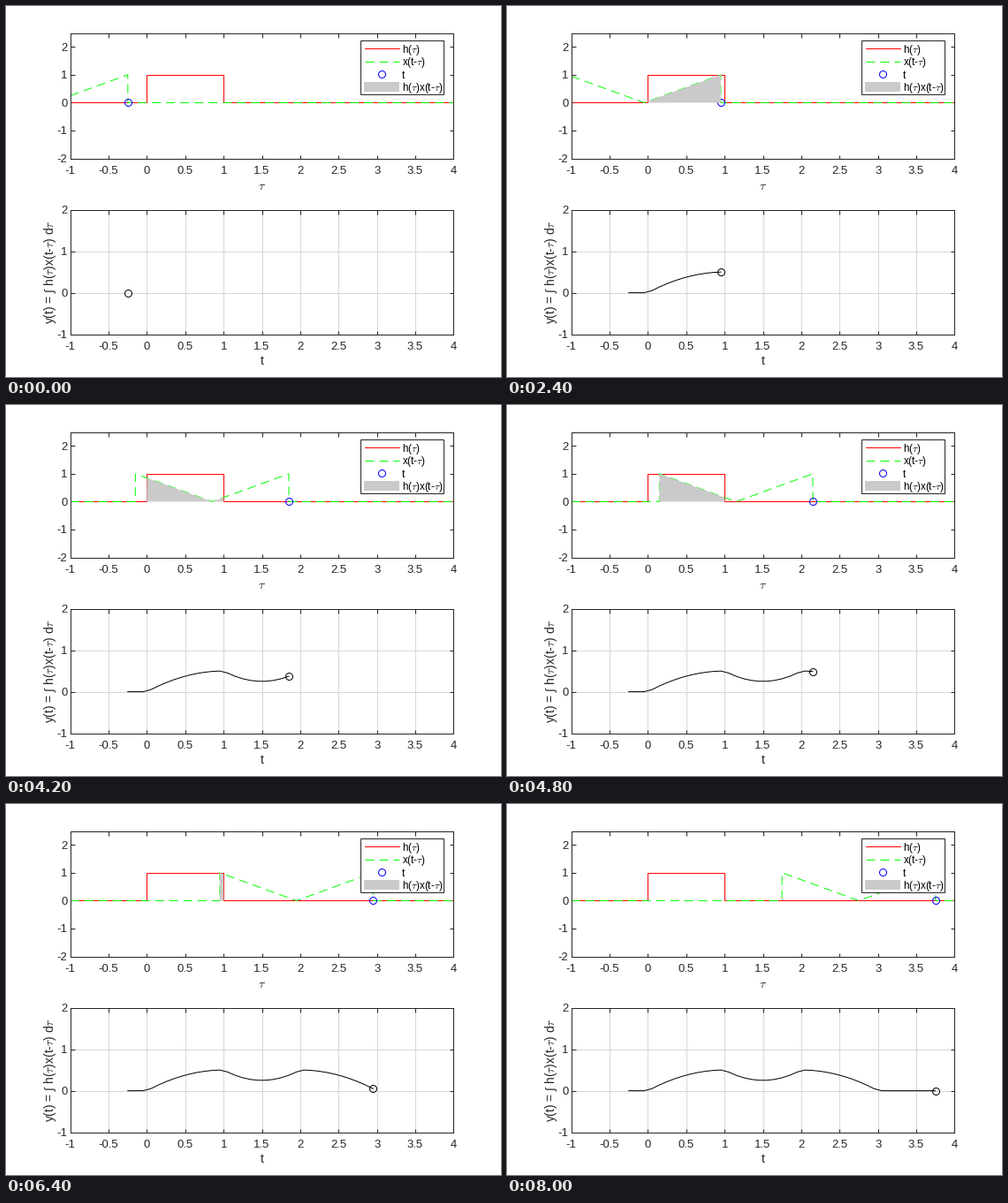
A matplotlib script that plays this animation: 560x420 px, repeating every 8200 ms.

```python
import numpy as np
import matplotlib as mpl
import matplotlib.pyplot as plt
from matplotlib.animation import FuncAnimation
from matplotlib.patches import Rectangle

W, H, DPI = 560, 420, 80
PX = 72 / DPI  # one pixel in points
INK, GREY, GRID = "#262626", "#cacaca", "#d8d8d8"
DASH = (0, (10, 6))

mpl.rcParams.update({
    "font.family": "Liberation Sans",
    "mathtext.fontset": "cm",
    "lines.linewidth": PX,
    "lines.markersize": 8 * PX,
    "axes.linewidth": PX,
    "axes.edgecolor": INK,
})

FRAMES = 41
times = -0.25 + 0.1 * np.arange(FRAMES)
tau = np.arange(-500, 2001) / 500


def vee(s):
    s = np.round(s, 6)
    return np.where((s >= 0) & (s <= 2), np.abs(s - 1), 0)


def vee_integral(s):
    d = np.clip(s, 0, 2) - 1
    return d * np.abs(d) / 2


gate = (tau >= 0) & (tau <= 1)
y = vee_integral(times) - vee_integral(times - 1)

fig = plt.figure(figsize=(W / DPI, H / DPI), dpi=DPI, facecolor="white")


def plot_box(top, bottom, ylim, yticks):
    left, right = 72.7, 506.4
    ax = fig.add_axes([left / W, 1 - bottom / H,
                       (right - left) / W, (bottom - top) / H])
    ax.set(xlim=(-1, 4), ylim=ylim)
    xticks = np.arange(-1, 4.1, 0.5)
    ax.set_xticks(xticks, [f"{v:g}" for v in xticks])
    ax.set_yticks(yticks, [str(v) for v in yticks])
    ax.tick_params(direction="in", top=True, right=True, length=4.5 * PX,
                   width=PX, color=INK, labelcolor=INK, labelsize=13.1 * PX)
    ax.tick_params(axis="x", pad=8 * PX)
    ax.tick_params(axis="y", pad=3.3 * PX)
    return ax


upper = plot_box(30.55, 172.55, (-2, 2.5), range(-2, 3))
lower = plot_box(230.6, 371.6, (-1, 2), range(-1, 3))
lower.set_axisbelow(True)
lower.grid(color=GRID, linewidth=PX)

# Pixel-space layer for labels and legend
layer = fig.add_axes([0, 0, 1, 1], zorder=5)
layer.set(xlim=(0, W), ylim=(H, 0))
layer.axis("off")


def label(x, y, s, size=13.9, color=INK, **kw):
    layer.text(x, y, s, fontsize=size * PX, color=color,
               va="baseline", rotation_mode="anchor", **kw)


label(290, 207.5, r"$\tau$", ha="center")
label(290, 406, "t", ha="center")
label(54, 301.5, r"y(t) = ∫ h($\tau$)x(t-$\tau$) d$\tau$",
      ha="center", rotation=90)

layer.add_patch(Rectangle((401, 39), 94, 61, facecolor="white",
                          edgecolor=INK, linewidth=PX))
layer.plot([406, 445], [48, 48], color="red")
layer.plot([406, 445], [63, 63], color="lime", ls=DASH)
layer.plot(424.6, 77, "o", mfc="none", mec="blue", mew=PX)
layer.add_patch(Rectangle((405, 86), 40, 11, facecolor=GREY, linewidth=0))
names = (r"h($\tau$)", r"x(t-$\tau$)", "t", r"h($\tau$)x(t-$\tau$)")
for i, name in enumerate(names):
    label(448, 52.6 + 14.6 * i, name, size=11.6, color="black")

upper.plot([-1, 0, 0, 1, 1, 4], [0, 0, 1, 1, 0, 0], color="red")
wave, = upper.plot([], [], color="lime", ls=DASH)
dot, = upper.plot([], [], "o", mfc="none", mec="blue", mew=PX)
area, = upper.fill([0, 0, 0], [0, 0, 0], color=GREY, linewidth=0, zorder=3)
curve, = lower.plot([], [], color="black")
head, = lower.plot([], [], "o", mfc="none", mec="black", mew=PX)


def update(k):
    t = times[k]
    x = vee(t - tau)
    wave.set_data(tau, x)
    dot.set_data([t], [0])
    area.set_xy(np.column_stack([tau, gate * x]))
    curve.set_data(times[:k + 1], y[:k + 1])
    head.set_data([t], [y[k]])
    return wave, dot, area, curve, head


anim = FuncAnimation(fig, update, frames=FRAMES, interval=200,
                     repeat=True, repeat_delay=0)
plt.show()
```
